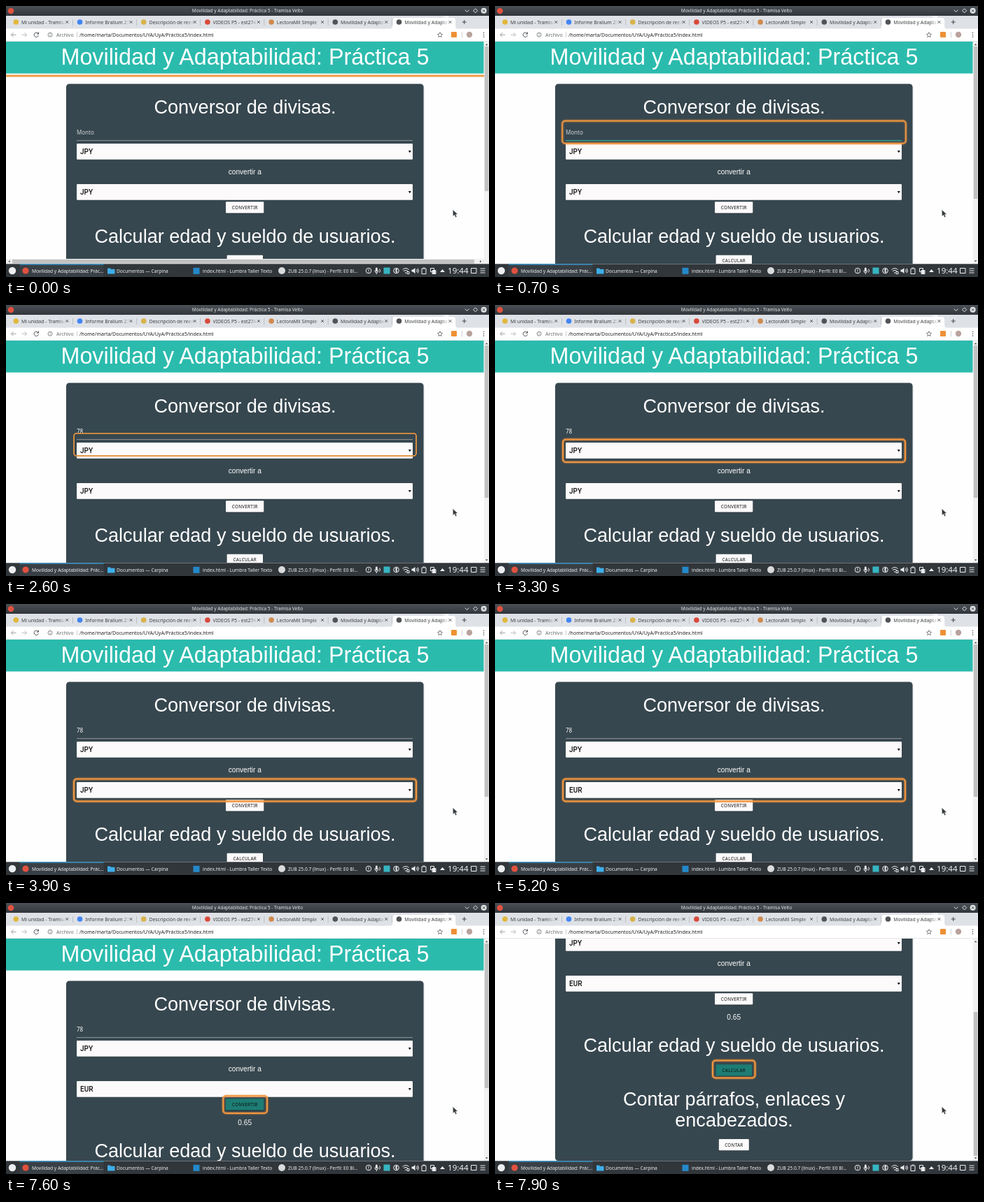
An HTML page for the animation above (8 s loop, 690 by 388 pixels).

```html
<!DOCTYPE html>
<html lang="es">
<head>
<meta charset="utf-8">
<title>Movilidad y Adaptabilidad: Práctica 5</title>
<style>
html, body { margin: 0; width: 100%; height: 100%; overflow: hidden; background: #fff; }
svg { display: block; }
text { font-family: "Noto Sans", sans-serif; white-space: pre; }
.mid { text-anchor: middle; }
.page text { fill: #fff; }
.page .h { font: 27.05px "Liberation Sans", Arial, sans-serif; }
.page .h1 { font: 32.3px "Liberation Sans", Arial, sans-serif; }
.page .p { font: 10.1px "Liberation Sans", Arial, sans-serif; }
.page .opt { font: 500 10px Roboto, sans-serif; fill: #111; }
.page .in { font-size: 8px; }
.page .label { font-size: 6.3px; letter-spacing: .3px; fill: #111; font-weight: 500; }
.tab { font-size: 6.9px; fill: #3c4043; }
.url { font-size: 7.05px; fill: #222; }
.task { font-size: 6.6px; fill: #eff0f1; }
.line { fill: none; stroke-width: 1; }

.page, .ring, .step, .btn { animation: 8s linear infinite; }
.step, .page { animation-timing-function: step-end; }
.page { animation-name: scroll; }
.ring { animation-name: ring, glow; animation-timing-function: ease-in-out, linear; fill: none; }
.hbar { animation-name: hbar; }
.hint { animation-name: hint; }
.seven { animation-name: seven; }
.amount { animation-name: amount; }
.focus { animation-name: focus; }
.jpy { animation-name: jpy; }
.eur { animation-name: eur; }
.result { animation-name: result; }
.below { animation-name: below; }
.thumb { animation-name: thumb; }
.btn { fill: #fcfafa; }
.convert { animation-name: convert; animation-timing-function: ease-out; }
.calc { animation-name: calc; animation-timing-function: ease-out; }

@keyframes scroll { 0% { transform: none } 95.625%, 100% { transform: translateY(-151px) } }
@keyframes ring {
  0%, 5.25% { x: -6px; y: 40px; width: 702px; height: 60px }
  9%, 30.25% { x: 97px; y: 165.5px; width: 489px; height: 32px }
  34%, 41.25% { x: 97px; y: 192.5px; width: 489px; height: 32.5px }
  45%, 76.04% { x: 97px; y: 250.5px; width: 489px; height: 32px }
  79.79%, 95.125% { x: 310.3px; y: 276.3px; width: 62.7px; height: 24.7px }
  98.7%, 100% { x: 311px; y: 376.5px; width: 60.5px; height: 25px }
}
/* thin while travelling, glowing at rest */
@keyframes glow {
  0%, 5.25%, 9%, 30.25%, 34%, 41.25%, 45%, 76%, 80%, 95.125%, 98.7%, 100% {
    stroke: #f2963f; stroke-width: 2px; filter: drop-shadow(0 0 1.3px #f2923a) }
  6%, 8.2%, 31%, 33.2%, 42%, 44.2%, 76.8%, 79%, 96%, 98% {
    stroke: #dc9040; stroke-width: 1.5px; filter: drop-shadow(0 0 .4px #f2923a) }
}
@keyframes hbar { 0% { opacity: 1 } 6.25%, 100% { opacity: 0 } }
@keyframes hint { 0% { opacity: 1 } 23.75%, 100% { opacity: 0 } }
@keyframes seven { 0% { opacity: 0 } 23.75% { opacity: 1 } 26.25%, 100% { opacity: 0 } }
@keyframes amount { 0% { opacity: 0 } 26.25%, 100% { opacity: 1 } }
@keyframes focus { 0% { opacity: 0 } 6.25% { opacity: 1 } 32%, 100% { opacity: 0 } }
@keyframes jpy { 0% { opacity: 1 } 63.75%, 100% { opacity: 0 } }
@keyframes eur { 0% { opacity: 0 } 63.75%, 100% { opacity: 1 } }
@keyframes result { 0% { opacity: 0 } 87.5%, 100% { opacity: 1 } }
@keyframes below { 0% { transform: none } 87.5%, 100% { transform: translateY(25.5px) } }
@keyframes thumb {
  0% { y: 58px; height: 207px }
  6.25% { y: 58px; height: 218px }
  87.5% { y: 58px; height: 207px }
  95.625%, 100% { y: 156px; height: 206px }
}
@keyframes convert { 0%, 76.04% { fill: #fcfafa } 79.79%, 95.125% { fill: #1d7d74 } 98.7%, 100% { fill: #fcfafa } }
@keyframes calc { 0%, 95.125% { fill: #fcfafa } 98.7%, 100% { fill: #1d7d74 } }
</style>
</head>
<body>
<svg width="690" height="388" viewBox="0 0 690 388">
  <defs>
    <clipPath id="view"><rect y="51" width="683" height="318"/></clipPath>
    <linearGradient id="fade"><stop stop-color="#dee1e6" stop-opacity="0"/><stop offset="1" stop-color="#dee1e6"/></linearGradient>
    <linearGradient id="fadeOn"><stop stop-color="#fff" stop-opacity="0"/><stop offset="1" stop-color="#fff"/></linearGradient>
    <linearGradient id="bar" x2="0" y2="1"><stop stop-color="#4b5157"/><stop offset="1" stop-color="#31363b"/></linearGradient>
  </defs>
  <rect width="690" height="388" fill="#fefefe"/>

  <!-- web page -->
  <g clip-path="url(#view)">
    <g class="page">
      <rect y="51" width="682.5" height="45.6" fill="#2bbbad"/>
      <text class="h1 mid" x="341.5" y="84.3">Movilidad y Adaptabilidad: Práctica 5</text>
      <rect x="85.5" y="112" width="512" height="409" rx="5" fill="#000" opacity=".15"/>
      <rect x="86" y="111.5" width="510.5" height="408.5" rx="4.5" fill="#37474f"/>
      <text class="h mid" x="341.5" y="153.7">Conversor de divisas.</text>

      <g class="in">
        <text class="step hint" x="101" y="183.8" style="fill:#d0d4d6">Monto</text>
        <text class="step seven" x="101" y="183.8">7</text>
        <text class="step amount" x="101" y="183.8">78</text>
      </g>
      <rect x="101" y="192.2" width="480" height=".9" fill="#9e9e9e"/>
      <rect class="step focus" x="101" y="191.9" width="480" height="1.3" fill="#26a69a"/>

      <rect x="101" y="197" width="480" height="22.8" rx="1" fill="#fcfafa"/>
      <text class="opt" x="106" y="211.8">JPY</text>
      <path d="M574.8 207h4l-2 3.2z" fill="#111"/>
      <text class="p mid" x="341.3" y="241">convertir a</text>
      <rect x="101" y="255" width="480" height="22.8" rx="1" fill="#fcfafa"/>
      <text class="opt step jpy" x="106" y="269.8">JPY</text>
      <text class="opt step eur" x="106" y="269.8">EUR</text>
      <path d="M574.8 265h4l-2 3.2z" fill="#111"/>

      <rect x="314" y="281" width="54.5" height="16.4" rx="1" opacity=".3"/>
      <rect class="btn convert" x="314" y="280.3" width="54.3" height="16.3" rx="1"/>
      <text class="label mid" x="341.3" y="290.9">CONVERTIR</text>
      <text class="p mid step result" x="341.2" y="317.8">0.65</text>

      <g class="step below">
        <text class="h mid" x="341.5" y="338.6">Calcular edad y sueldo de usuarios.</text>
        <rect x="315.6" y="357.4" width="51.6" height="16.4" rx="1" opacity=".3"/>
        <rect class="btn calc" x="315.6" y="356.7" width="51.4" height="16.3" rx="1"/>
        <text class="label mid" x="341.3" y="367.3">CALCULAR</text>
        <text class="h mid" x="341.5" y="415.4">Contar párrafos, enlaces y</text>
        <text class="h mid" x="341.5" y="445.2">encabezados.</text>
        <rect x="319.8" y="464.2" width="43.2" height="16.4" rx="1" opacity=".3"/>
        <rect class="btn" x="319.8" y="463.5" width="43" height="16.3" rx="1"/>
        <text class="label mid" x="341.4" y="474.1">CONTAR</text>
      </g>
      <rect class="ring" rx="4"/>
    </g>
  </g>

  <!-- scrollbars -->
  <rect x="683" y="51" width="7" height="318.5" fill="#f1f1f1"/>
  <path d="M684.8 56.2h3.6l-1.8-2.2zM684.8 364.2h3.6l-1.8 2.2z" fill="#555"/>
  <rect class="step thumb" x="683.8" y="58" width="5.6" height="207" fill="#c1c1c1"/>
  <g class="step hbar">
    <rect y="362" width="690" height="7.5" fill="#f1f1f1"/>
    <rect x="9" y="363" width="660" height="5.6" fill="#c1c1c1"/>
    <path d="M5.6 364v3.6l-2.2-1.8zM677 364v3.6l2.2-1.8z" fill="#555"/>
  </g>

  <!-- window title -->
  <rect width="690" height="14" fill="url(#bar)"/>
  <circle cx="7" cy="7" r="4.3" fill="#e0523f"/>
  <text class="mid" x="345" y="9.4" font-size="6.5" fill="#e4e6e7">Movilidad y Adaptabilidad: Práctica 5 - Tramisa Velto</text>
  <path class="line" stroke="#e4e6e7" d="M655.8 5.6l2.8 2.8 2.8-2.8M670.6 3.8l3 3-3 3-3-3z"/>
  <circle cx="682.6" cy="6.8" r="4" fill="#e4e6e7"/>
  <path class="line" stroke="#31363b" d="M681 5.2l3.2 3.2M684.2 5.2L681 8.4"/>

  <!-- tabs and toolbar -->
  <rect y="14" width="690" height="19" fill="#dee1e6"/>
  <rect y="32.5" width="690" height="18.5" fill="#fff"/>
  <g id="tabs"></g>
  <path class="line" stroke="#44484c" d="M651.7 23h6M654.7 20v6"/>
  <rect y="50.4" width="690" height=".6" fill="#d5d7da"/>
  <g class="line">
    <path stroke="#9a9da1" d="M14.5 41.2h-7m3-3l-3 3 3 3"/>
    <path stroke="#b8bbbf" d="M22.5 41.2h7m-3-3l3 3-3 3"/>
    <path stroke="#505357" d="M46 39.5a3.2 3.2 0 1 0 .4 2.6M46.5 37.5v2.6h-2.6"/>
    <circle cx="63" cy="41.2" r="3" stroke="#666a6e" stroke-width=".8"/>
    <path stroke="#666a6e" stroke-width=".8" d="M63 40.8v2M63 39.2v.8"/>
    <path stroke="#606468" stroke-width=".8" d="M620 37.6l1 2.5 2.6.2-2 1.7.6 2.6-2.2-1.4-2.2 1.4.6-2.6-2-1.7 2.6-.2z"/>
    <path stroke="#d0d2d5" d="M651.5 37v8.5"/>
  </g>
  <text class="url" x="72" y="43.8" style="fill:#666a6e">Archivo</text>
  <rect x="101" y="37.5" width=".6" height="7.5" fill="#a9acb0"/>
  <text class="url" x="105" y="43.8">/home/marta/Documentos/UYA/UyA/Práctica5/index.html</text>
  <rect x="636" y="37" width="8" height="8" rx="1" fill="#ef9035"/>
  <circle cx="662" cy="41" r="4.2" fill="#b9a29c"/>
  <g fill="#505357"><circle cx="682.5" cy="38.3" r=".8"/><circle cx="682.5" cy="41.2" r=".8"/><circle cx="682.5" cy="44.1" r=".8"/></g>

  <!-- taskbar -->
  <rect y="369.3" width="690" height="18.7" fill="#31363b"/>
  <rect x="19.5" y="369.3" width="120" height="18.7" fill="#383f45"/>
  <rect x="19.5" y="369.3" width="120" height="1.2" fill="#3daee9"/>
  <circle cx="9" cy="379" r="5.2" fill="#eceeef"/>
  <circle cx="28" cy="379" r="4.6" fill="#e0523f"/>
  <text class="task" x="37" y="381.5">Movilidad y Adaptabilidad: Prác…</text>
  <path d="M145 375.5h4l1 1.2h5.5v6.8H145z" fill="#3daee9"/>
  <text class="task" x="158" y="381.5">Documentos — Carpina</text>
  <rect x="267.5" y="374.8" width="9" height="9" fill="#2489ca"/>
  <text class="task" x="281" y="381.5">index.html - Lumbra Taller Texto</text>
  <circle cx="394" cy="379" r="5" fill="#d9dbdc"/>
  <text class="task" x="403" y="381.5">ZUB 25.0.7 (linux) - Perfil: E0 Bl…</text>
  <g class="line" stroke="#eff0f1">
    <circle cx="518" cy="379" r="3.8"/><path d="M518 376.8v2.6M518 380.4v1"/>
    <path d="M527 378.5v1a2.3 2.3 0 0 0 4.6 0v-1M529.3 382v2M533.5 376.5q2 2.5 0 5"/>
    <circle cx="557.5" cy="379" r="3.8"/><path d="M556 377l3 3.5-1.5 1.5v-6l1.5 1.2-3 3.3"/>
    <path d="M566.5 377.5q4.5-4 9 0M568 379.6q3-2.6 6 0M570 382h2M573 380.5h3v3h-3z"/>
    <path d="M586.5 377q1.8 2 0 4M588 375.5q3 3.5 0 7"/>
    <path d="M594 376h6v7.5h-6zM595.5 375h3"/>
    <path d="M606.5 375.5h5v5h-5zM609 378.5h5v5h-5z"/>
    <path d="M664.5 375.5h7.5v7h-7.5zM677.5 376h7M677.5 379h7M677.5 382h7"/>
  </g>
  <rect x="527.9" y="374.5" width="2.8" height="5.8" rx="1.4" fill="#eff0f1"/>
  <rect x="539.5" y="374.5" width="9" height="9" fill="#36b5c1"/>
  <path d="M579.5 377.5h2l3-2.5v8l-3-2.5h-2zM620 381l3.5-4 3.5 4zM609.5 379h4v4h-4z" fill="#eff0f1"/>
  <text x="631" y="383.2" font-size="11.6" fill="#eff0f1">19:44</text>

  <path d="M638.3 291.8l.3 9.2 2-1.9 1.6 3.4 1.7-.8-1.5-3.3 2.7-.3z" fill="#34393d" stroke="#d4d6d7" stroke-width=".5"/>
</svg>
<script>
const tabs = [
  ["Mi unidad - Tramisa", "#e2b83c"],
  ["Informe Bralium 27", "#4285f4"],
  ["Descripción de reenv", "#d8b24a"],
  ["VIDEOS P5 - est274", "#d9493a"],
  ["LectoraMil Simple", "#cf8a4e"],
  ["Movilidad y Adaptab", "#505357"],
  ["Movilidad y Adaptab", "#505357"]
];
const pitch = 91.2;
document.getElementById("tabs").innerHTML = tabs.map(([name, color], i) => {
  const x = i * pitch, on = i === tabs.length - 1;
  const back = on
    ? `<path d="M${x + 1} 33q4 0 4-4v-8q0-4 4-4h82q4 0 4 4v8q0 4 4 4z" fill="#fff"/>`
    : `<rect x="${x + 95}" y="19" width=".6" height="9" fill="#a5a8ac"/>`;
  return `${back}<circle cx="${x + 14.3}" cy="23" r="3.8" fill="${color}"/>
    <svg x="${x + 22}" y="14" width="63" height="19">
      <text class="tab" y="11.6">${name}</text>
      <rect x="53" width="10" height="19" fill="url(#${on ? "fadeOn" : "fade"})"/>
    </svg>
    <path class="line" stroke="#505357" stroke-width=".8" d="M${x + 85.5} 21.2l3.6 3.6m0-3.6l-3.6 3.6"/>`;
}).join("");
</script>
</body>
</html>
```
